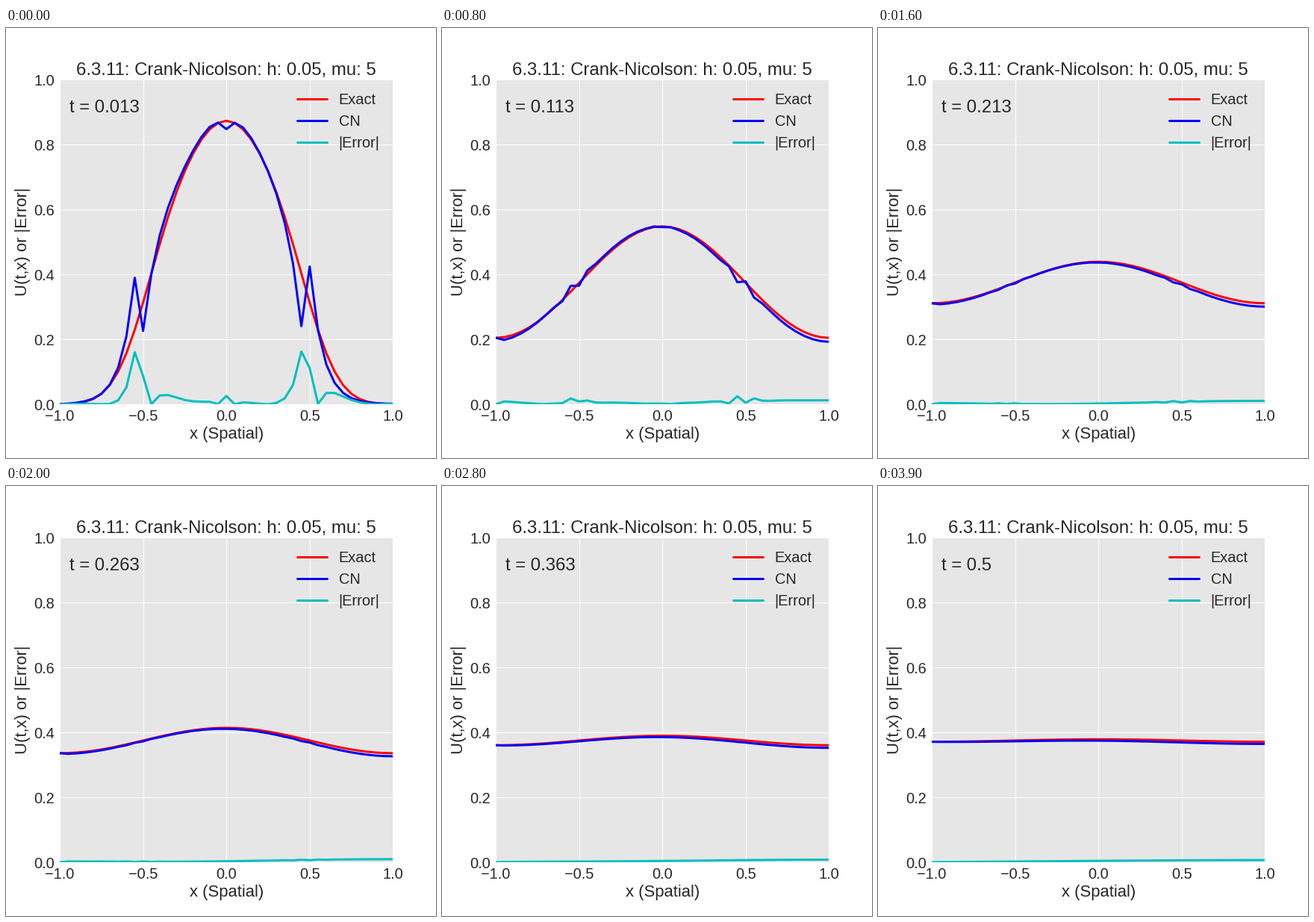
A matplotlib script for the animation above (4000 ms loop, 576 px wide and 576 px high).

```python
import numpy as np
import matplotlib.pyplot as plt
from matplotlib.animation import FuncAnimation

H, MU, STEPS = 0.05, 5, 40
K = MU * H**2
X = np.linspace(-1, 1, 41)
INK = "0.15"

plt.rcParams.update({
    "font.family": "Liberation Sans",
    "text.color": INK,
    "axes.labelcolor": INK,
    "xtick.color": INK,
    "ytick.color": INK,
    "lines.linewidth": 3,
    "lines.solid_capstyle": "round",
})


def exact(t):
    """Fourier series of the heat equation solution."""
    u = np.full_like(X, 3 / 8)
    for j in range(25):
        w = np.pi * (2 * j + 1)
        u += ((-1)**j / w + 2 / w**2) * np.cos(w * X) * np.exp(-w**2 * t)
        u += np.cos(2 * w * X) / w**2 * np.exp(-4 * w**2 * t)
    return u


def crank_nicolson():
    """Dirichlet on the left (lagged in the solve), Neumann on the right."""
    size = len(X)
    lap = -2 * np.eye(size) + np.eye(size, k=1) + np.eye(size, k=-1)
    lap[0] = 0
    lap[-1, -2] = 2
    left = np.eye(size) - MU / 2 * lap
    right = np.eye(size) + MU / 2 * lap

    # The hat includes x = -0.5 but not x = 0.5.
    inside = (X > -0.5 - H / 2) & (X < 0.5 - H / 2)
    u = np.where(inside, 1 - np.abs(X), 0)
    history = []
    for n in range(1, STEPS + 1):
        u = np.linalg.solve(left, right @ u)
        u[0] = exact(n * K)[0]
        history.append(u.copy())
    return history


solution = crank_nicolson()

fig = plt.figure(figsize=(8, 8), dpi=72, facecolor="white")
ax = fig.add_axes([0.125, 0.125, 0.775, 0.755], facecolor="0.9")
ax.set(xlim=(-1, 1), ylim=(0, 1))
ax.set_xticks(np.linspace(-1, 1, 5))
ax.set_yticks(np.linspace(0, 1, 6))
ax.tick_params(length=0, pad=7, labelsize=20)
ax.set_axisbelow(True)
ax.grid(color="white", linewidth=1)
ax.spines[:].set_visible(False)
ax.set_title(f"6.3.11: Crank-Nicolson: h: {H}, mu: {MU}", fontsize=24, pad=6)
ax.set_xlabel("x (Spatial)", fontsize=22, labelpad=4)
ax.set_ylabel("U(t,x) or |Error|", fontsize=22, labelpad=4)

curves = []
for row, (name, color) in enumerate([("Exact", "r"), ("CN", "b"),
                                     ("|Error|", "c")]):
    curves += ax.plot([], [], color=color)
    # Legend entry, placed in pixels from the bottom left corner.
    y = 576 - (95.2 + 29 * row)
    ax.plot([390, 430], [y, y], color=color, transform=None)
    ax.text(445.6, y - 7, name, fontsize=20, transform=None)

clock = ax.text(-0.94, 0.9, "", fontsize=24)


def update(i):
    t = (i + 1) * K
    u, v = exact(t), solution[i]
    for curve, values in zip(curves, (u, v, np.abs(u - v))):
        curve.set_data(X, values)
    clock.set_text(f"t = {round(t + 1e-9, 3)}")
    return [*curves, clock]


anim = FuncAnimation(fig, update, frames=STEPS, interval=100, repeat=True)
plt.show()
```
